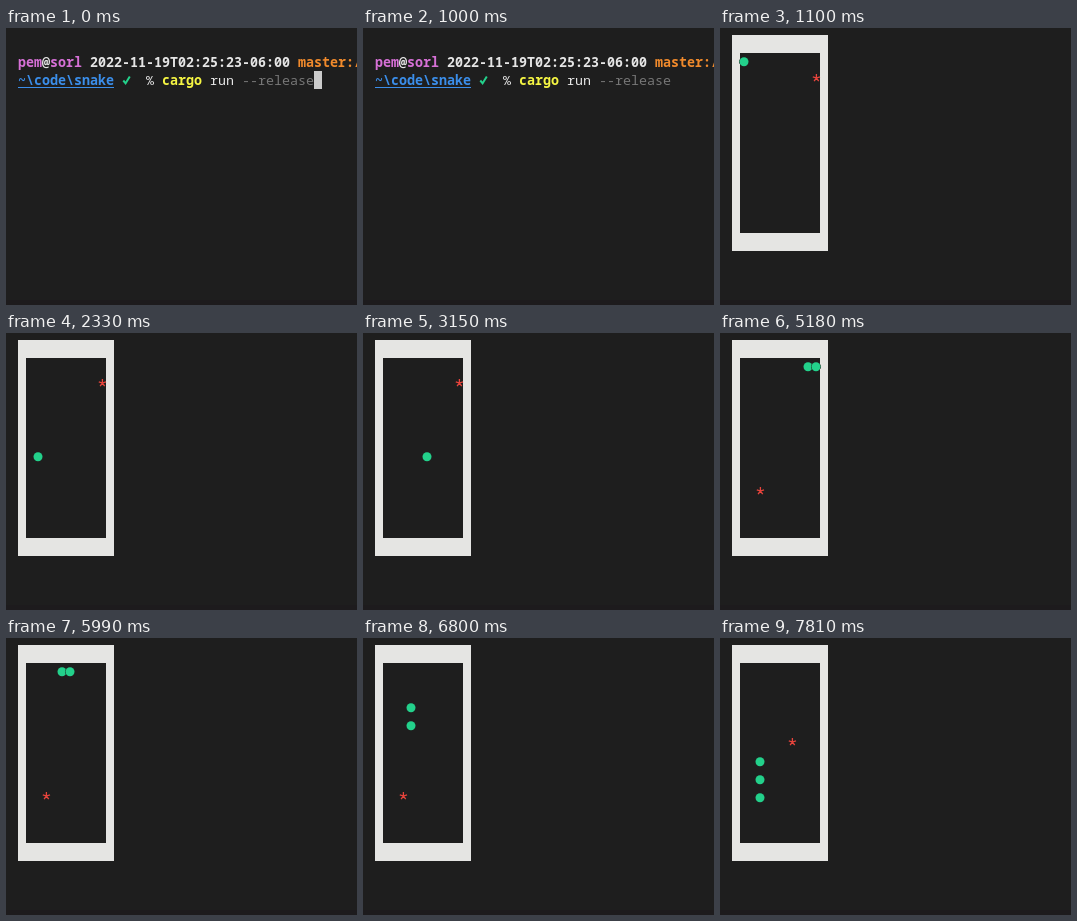
Recreate the animation shown at these times as an HTML page. Size 351 px wide and 277 px high, loop 8 s.

```html
<!DOCTYPE html>
<html lang="en">
<head>
<meta charset="utf-8">
<title>Terminal snake</title>
<style>
  html, body { margin: 0; width: 100%; height: 100%; overflow: hidden; background: #1e1e1e; }
  svg { display: block; width: 351px; height: 277px; }
  text { font: bold 13.333px "Noto Sans Mono", "DejaVu Sans Mono", monospace; fill: #e5e5e5; white-space: pre; }
  .user { fill: #d670d6; }
  .branch { fill: #f08a2c; }
  .path { fill: #3b8eea; }
  .program { fill: #f5f543; }
  .plain { font-weight: normal; }
  .flag { font-weight: normal; fill: #767676; }
  .segment { fill: #23d18b; stroke: #1e1e1e; stroke-width: 1; paint-order: stroke; }
</style>
</head>
<body>
<svg viewBox="0 0 351 277">
  <rect width="351" height="277" fill="#1e1e1e"/>
  <rect y="272" width="351" height="5" fill="#1d1b1d"/>
  <g id="prompt">
    <text class="user" x="12" y="39">pem</text>
    <text x="36" y="39">@</text>
    <text class="user" x="44" y="39">sorl</text>
    <text x="84" y="39">2022-11-19T02:25:23-06:00</text>
    <text class="branch" x="292" y="39">master:/</text>
    <text class="path" x="12" y="57">~\code\snake</text>
    <path d="M12 59.5H108" stroke="#3b8eea"/>
    <path d="M117.3 52.5L119.6 55.3L123.8 48.5" fill="none" stroke="#23d18b" stroke-width="2"/>
    <text class="plain" x="140" y="57">%</text>
    <text class="program" x="156" y="57">cargo</text>
    <text class="plain" x="204" y="57">run</text>
    <text class="flag" x="236" y="57">--release</text>
    <rect id="cursor" x="308" y="43" width="8" height="18" fill="#cccccc"/>
  </g>
  <g id="game">
    <path d="M12 7H108V223H12ZM20 25V205H100V25Z" fill="#e5e5e3" fill-rule="evenodd"/>
    <path id="food" d="M0 0V-4M0 0L3.6 -1.2M0 0L2.3 3.2M0 0L-2.3 3.2M0 0L-3.6 -1.2" stroke="#e8443c" stroke-width="1.3"/>
    <g id="snake">
      <circle class="segment" r="4.5"/>
      <circle class="segment" r="4.5"/>
      <circle class="segment" r="4.5"/>
    </g>
  </g>
</svg>
<script>
  const LOOP = 8000, RUN = 1000, START = 1100;
  const moveTimes = [
    1330, 1530, 1730, 1900, 2130, 2330, 2530, 2730, 2940, 3150, 3350,
    3550, 3760, 3960, 4160, 4370, 4570, 4770, 4970, 5170, 5380, 5580,
    5760, 5990, 6190, 6390, 6590, 6800, 7000, 7200, 7400, 7610, 7810
  ];
  const moves = "DDDDD" + "RRRRRRRR" + "UUUU" + "RU" + "LLLLLL" + "DDDD" + "LDDD";
  const steps = { U: [0, -1], D: [0, 1], L: [-1, 0], R: [1, 0] };
  const foods = [[9, 1], [2, 7], [6, 4]];

  const trail = [[0, 0]];
  const eaten = [0];
  for (const move of moves) {
    const [x, y] = trail.at(-1), [dx, dy] = steps[move];
    const head = [x + dx, y + dy];
    const count = eaten.at(-1);
    trail.push(head);
    eaten.push(count + (String(head) === String(foods[count])));
  }

  const byId = id => document.getElementById(id);
  const [prompt, cursor, game, food, snake] = ["prompt", "cursor", "game", "food", "snake"].map(byId);
  const show = (element, on) => element.setAttribute("visibility", on ? "visible" : "hidden");
  const place = (element, [col, row], dx = 0, dy = 0) =>
    element.setAttribute("transform", `translate(${24 + col * 8 + dx} ${34 + row * 18 + dy})`);

  function draw() {
    const time = performance.now() % LOOP;
    const playing = time >= START;
    const step = moveTimes.filter(t => t <= time).length;

    show(prompt, !playing);
    show(cursor, time < RUN);
    show(game, playing);
    place(food, foods[eaten[step]], 0.4, -2);
    [...snake.children].forEach((segment, i) => {
      const alive = i <= eaten[step];
      show(segment, playing && alive);
      if (alive) place(segment, trail[step - i], 0, -0.2);
    });
    requestAnimationFrame(draw);
  }
  draw();
</script>
</body>
</html>
```
